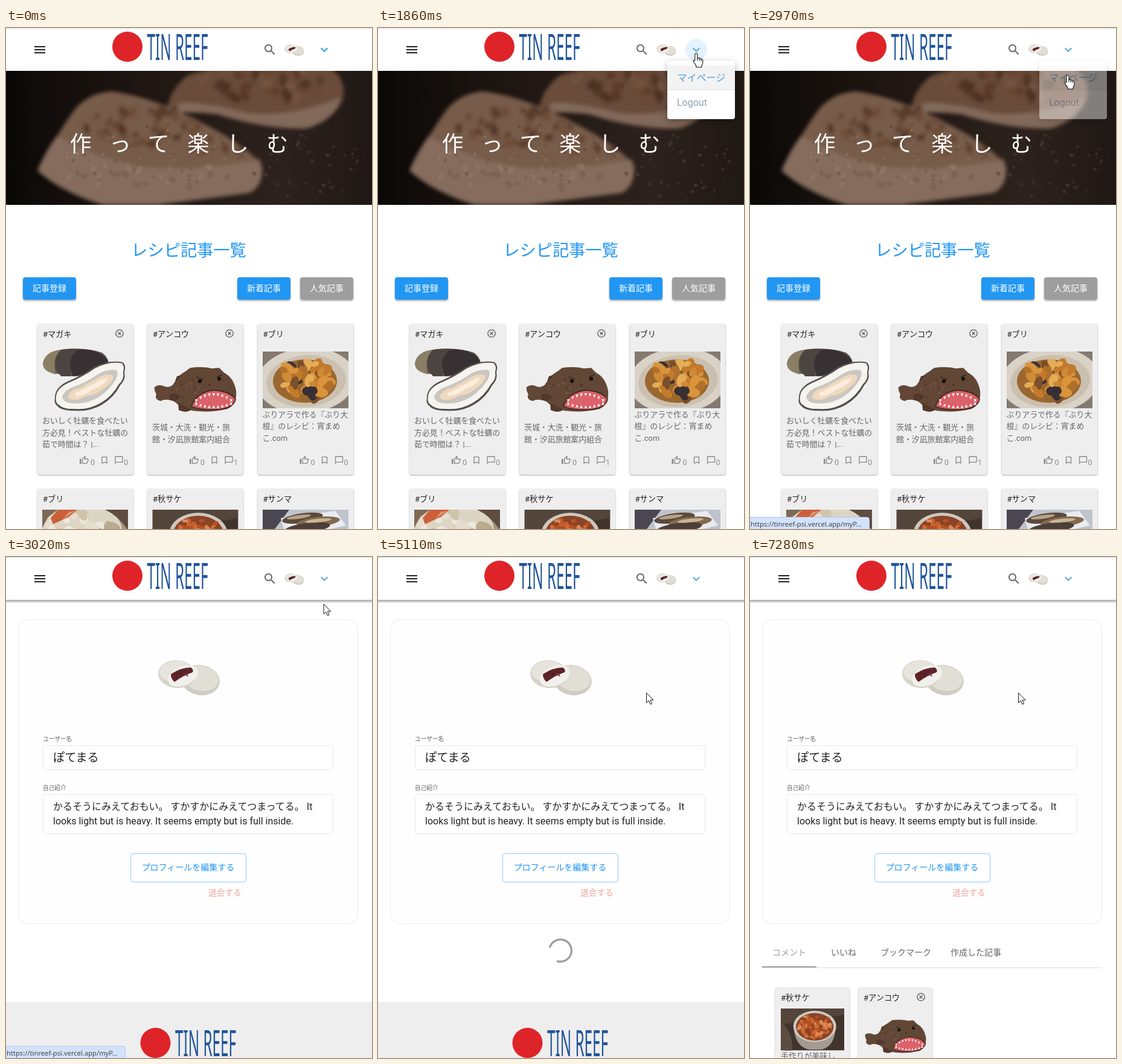
Recreate the animation shown at these times as an HTML page. Size 606 by 830 pixels, loop 8 s.

```html
<!DOCTYPE html>
<html lang="ja">
<head>
<meta charset="utf-8">
<title>Recipe site</title>
<style>
html, body { margin: 0; width: 100%; height: 100%; overflow: hidden; background: #fff; }
svg { display: block; width: 100%; height: 100%; }
text { font-family: Roboto, "Noto Sans CJK JP", "Noto Sans CJK", sans-serif; white-space: pre; }
.card { filter: drop-shadow(0 1px 1px rgba(0, 0, 0, .35)); }
.raised { filter: drop-shadow(0 2px 1.5px rgba(0, 0, 0, .35)); }
.menu { filter: drop-shadow(0 4px 6px rgba(0, 0, 0, .3)); }
.soft { filter: blur(3px); }
.hazy { filter: blur(1.2px); }
</style>
</head>
<body>
<svg id="stage" viewBox="0 0 606 830" preserveAspectRatio="none"></svg>
<script>
const BLUE = '#2196f3', GREY = '#9e9e9e', INK = '#222', MUTED = '#666';

// ---------- drawing helpers ----------
const text = (x, y, s, size, fill, more = '') =>
  `<text x="${x}" y="${y}" font-size="${size}" fill="${fill}" ${more}>${s}</text>`;
const rect = (x, y, w, h, fill, more = '') =>
  `<rect x="${x}" y="${y}" width="${w}" height="${h}" fill="${fill}" ${more}/>`;
const oval = (x, y, rx, ry, fill, turn = 0, more = '') =>
  `<ellipse rx="${rx}" ry="${ry}" fill="${fill}" transform="translate(${x} ${y}) rotate(${turn})" ${more}/>`;
const path = (d, fill, more = '') => `<path d="${d}" fill="${fill}" ${more}/>`;
const group = (s, more = '') => `<g ${more}>${s}</g>`;
const at = (x, y, k = 1) => `transform="translate(${x} ${y}) scale(${k})"`;
const use = (id, x, y, k) => `<use href="#${id}" ${at(x, y, k)}/>`;
const MID = 'text-anchor="middle"';

function random(seed) {
  return () => (seed = seed * 16807 % 2147483647) / 2147483647;
}

// Scatter of small ovals inside an ellipse
function lumps(seed, n, cx, cy, rx, ry, size, colors) {
  const rnd = random(seed);
  let s = '';
  for (let i = 0; i < n; i++) {
    const a = rnd() * 6.283, d = Math.sqrt(rnd()), k = size * (.6 + rnd() * .7);
    s += oval((cx + rx * d * Math.cos(a)).toFixed(1), (cy + ry * d * Math.sin(a)).toFixed(1),
      k.toFixed(1), (k * .65).toFixed(1), colors[i % colors.length], Math.round(rnd() * 180));
  }
  return s;
}

const ICONS = {
  menu: 'M3 18h18v-2H3zM3 13h18v-2H3zM3 6v2h18V6z',
  search: 'M15.5 14h-.79l-.28-.27C15.41 12.59 16 11.11 16 9.5 16 5.91 13.09 3 9.5 3S3 5.91 3 9.5 5.91 16 9.5 16c1.61 0 3.09-.59 4.23-1.57l.27.28v.79l5 4.99L20.49 19l-4.99-5zm-6 0C7.01 14 5 11.99 5 9.5S7.01 5 9.5 5 14 7.01 14 9.5 11.99 14 9.5 14z',
  more: 'M16.59 8.59L12 13.17 7.41 8.59 6 10l6 6 6-6z',
  like: 'M9 21h9c.83 0 1.54-.5 1.84-1.22l3.02-7.05c.09-.23.14-.47.14-.73v-2c0-1.1-.9-2-2-2h-6.31l.95-4.57.03-.32c0-.41-.17-.79-.44-1.06L14.17 1 7.58 7.59C7.22 7.95 7 8.45 7 9v10c0 1.1.9 2 2 2zM9 9l4.34-4.34L12 10h9v2l-3 7H9zM1 9h4v12H1z',
  mark: 'M17 3H7c-1.1 0-2 .9-2 2v16l7-3 7 3V5c0-1.1-.9-2-2-2zm0 15l-5-2.18L7 18V5h10z',
  chat: 'M20 2H4c-1.1 0-2 .9-2 2v18l4-4h14c1.1 0 2-.9 2-2V4c0-1.1-.9-2-2-2zm0 14H6l-2 2V4h16z'
};
const icon = (name, x, y, fill, k = 1, more = '') => path(ICONS[name], fill, at(x, y, k) + ' ' + more);
const close = (x, y) => `<path d="M6.2 0a6.2 6.2 0 1 1-12.4 0a6.2 6.2 0 1 1 12.4 0M-2.5-2.5l5 5M2.5-2.5l-5 5" fill="none" stroke="#555" stroke-width="1.3" ${at(x, y)}/>`;

// ---------- pictures ----------
function oyster() {
  return path('M1 22Q6 6 30 3Q70-2 98 8Q112 18 108 34Q80 48 50 47Q16 44 4 34Q-1 28 1 22Z', '#5b4d48') +
    path('M1 22Q6 6 30 3Q14 18 22 44Q-4 38 1 22Z', '#8a7f64') +
    path('M30 3Q46 0 60 2Q40 18 46 47H30Q12 24 30 3Z', '#4b4440') +
    path('M60 2Q96 2 108 22Q108 32 96 38L50 47Q36 18 60 2Z', '#383133') +
    path('M20 82Q20 66 40 56Q64 46 84 32Q106 20 130 23Q139 27 135 40Q138 52 128 62Q118 82 98 94Q78 106 52 104Q30 104 24 96Q18 92 20 82Z', '#55504d') +
    path('M22 80Q23 67 42 58Q66 48 86 34Q108 22 130 25Q136 29 133 40Q135 52 126 60Q115 80 96 91Q76 103 52 101Q34 102 26 94Q20 90 22 80Z', '#f6f4ee') +
    path('M32 81Q35 70 52 64Q74 56 92 43Q108 34 122 37Q126 42 121 52Q110 70 92 82Q72 93 52 92Q34 92 32 81Z', '#cac6c2') +
    path('M42 79Q45 70 62 66Q80 56 96 47Q112 41 117 47Q116 57 100 68Q88 78 74 79Q60 87 50 86Q40 85 42 79Z', '#f1d9bd') +
    path('M54 75Q70 68 84 60Q98 50 108 50Q102 62 84 68Q70 79 54 80Z', '#fbeee0');
}

function angler() {
  let teeth = '';
  for (let i = 0; i < 9; i++) {
    const x = 70 + i * 7.2, u = (i - 4) / 4.4;
    const top = 44 + 12 * u * u, low = 69 - 7 * u * u;
    teeth += `M${x - 2.2} ${top}h4.4l-2.2 5zM${x - 2.2} ${low}h4.4l-2.2-5z`;
  }
  return path('M1 34Q8 28 18 33Q27 36 34 27Q40 14 52 8L60 2Q80-1 96 3L108 2L116 10Q132 18 136 40Q138 62 122 70Q92 77 64 73Q46 70 34 58Q20 52 11 57Q0 54 4 46Q0 40 1 34Z', '#624736') +
    path('M40 60L41 72Q54 78 62 71ZM34 27L38 16L48 13Z', '#523828') +
    lumps(91, 12, 52, 36, 22, 20, 2.2, ['#735543', '#533a2a']) +
    path('M62 66Q70 42 100 39Q126 41 135 54Q132 68 108 71Q80 73 62 66Z', '#dc626a', 'stroke="#442d20" stroke-width="1.8"') +
    path(teeth, '#fff') +
    oval(76, 24, 3.2, 3.2, '#171312') + oval(108, 20, 3.2, 3.2, '#171312') +
    path('M70 17l11 4M114 13l-10 4M91 28l2 4', 'none', 'stroke="#3a281d" stroke-width="1.8"') +
    path('M26 46Q36 42 44 50Q38 59 26 55Z', '#523828');
}

// Bean bun, 102 x 60
function bun() {
  return oval(70, 34, 32, 25, '#cfccc1', 10) + oval(71, 31, 29, 21, '#e0ded5', 10) +
    oval(31, 24, 31, 23, '#d5d2c8', 4) + oval(28, 19, 26, 17, '#e6e4dc', -8) +
    oval(41, 27, 26, 16, '#f1f0ec', -22) +
    path('M21 24Q38 13 54 13Q59 16 57 21Q42 26 27 37Q21 32 21 24Z', '#5d2328') +
    lumps(23, 9, 40, 24, 12, 4, 2.2, ['#6d2a2f', '#4c1b20']);
}

const stew = () => rect(0, 0, 142, 94, '#857a70') + oval(72, 48, 82, 54, '#d9d2c6', -5) +
  oval(72, 49, 66, 43, '#cbc0b0', -5) + oval(70, 49, 53, 36, '#9a672f') +
  lumps(7, 60, 70, 49, 46, 31, 10, ['#d9943c', '#c47a2b', '#e3ad58', '#7a4f2b', '#cf8a35', '#b0702c', '#383032']);
const hotpot = () => rect(0, 0, 142, 94, '#a4937c') + oval(66, 34, 66, 44, '#ddd5c4') +
  lumps(17, 24, 64, 30, 56, 26, 11, ['#eee9de', '#cfc4aa', '#e5dece', '#b9ab8d']) +
  path('M0 0H26L10 12L0 30Z', '#7d6a56') + path('M26 0H58L44 12L18 24L14 14Z', '#cb5f3a') + path('M44 4L54 2L34 16Z', '#e09a76') +
  path('M104 0H142V34Q126 10 104 0Z', '#5f4d41');
const salmon = () => rect(0, 0, 142, 94, '#41342d') + path('M0 0H142V14L0 36Z', '#54453b') +
  path('M29 38Q30 84 62 92H92Q122 84 123 38Z', '#a39a92') +
  oval(76, 40, 48, 35, '#cfc8c0') + oval(76, 41, 42, 31, '#8a4326') +
  lumps(29, 64, 76, 39, 37, 27, 5.5, ['#cf6a35', '#b54f22', '#de8954', '#c45f2c']) +
  oval(6, 66, 16, 38, '#5d4d41', -20);
const saury = () => rect(0, 0, 142, 94, '#bfc3cc') + path('M0 0H44L20 32L0 40Z', '#4a4752') +
  path('M30 14L120 2L138 26L40 50Z', '#e9ebef') +
  group(oval(66, 14, 34, 8, '#5a4a3d', -8) + oval(92, 20, 36, 8, '#82694f', -6) + oval(74, 30, 38, 8, '#4c3e38', -7) +
    oval(60, 12, 20, 3, '#b9a284', -8) + oval(92, 18, 22, 3, '#c9b592', -6));

function hero() {
  const crust = ['#3d2618', '#7b5a45', '#4a2d1c', '#69462f'];
  return rect(0, 0, 606, 222, 'url(#pan)') +
    group(
      path('M266 70Q268 34 300 8Q340-8 400-6H535Q566 14 557 50Q540 84 490 96Q420 94 350 68Q300 62 266 70Z', '#6a4c3a') +
      path('M266 72Q270 54 300 52Q350 56 400 70Q470 78 553 44Q550 78 500 95Q430 98 350 72Q300 66 266 72Z', '#82695a') +
      path('M52 165Q80 112 112 66Q134 38 172 34Q230 40 300 74Q390 116 424 156Q428 188 404 202Q330 212 250 222H160Q90 200 52 165Z', '#785c4a') +
      path('M52 165Q66 132 84 108Q150 146 230 160Q330 166 420 146Q430 186 404 202Q330 212 250 222H160Q90 200 52 165Z', '#856c5d'), 'class="soft"') +
    group(lumps(41, 44, 420, 24, 118, 26, 9, crust) + lumps(53, 60, 225, 92, 95, 34, 8, crust) +
      lumps(59, 16, 350, 128, 46, 16, 6, crust), 'class="soft" opacity=".65"') +
    group(lumps(61, 70, 250, 138, 150, 54, 2, ['#40301f', '#b09582', '#4d4023']) +
      lumps(67, 30, 240, 176, 140, 24, 6, ['#745b4c', '#977c6c']) +
      lumps(77, 60, 500, 156, 100, 56, 3, ['#55453c', '#30241f', '#5f5045']), 'class="hazy" opacity=".55"');
}

// ---------- page parts ----------
const logo = (x, y) => group(`<circle cx="31" cy="26" r="25" fill="#de2429"/>` +
  text(0, 0, 'TIN REEF', 60, '#20549b', 'style="font-family:Noto Sans,sans-serif" transform="translate(63.5 48) scale(.404 1)"'), at(x, y));

const button = (x, s, fill, id = '') => group(rect(x, 413, 88, 37, fill, `rx="4" ${id}`), 'class="raised"') +
  text(x + 44, 436, s, 14, '#fff', MID + ' font-weight="500"');

const cardBox = (x, y, w, title) => rect(x, y, w, 250, '#eee', 'rx="4" class="card"') +
  text(x + 9, y + 22, title, 13.2, INK);

function card(x, title, art, lines, y, chats) {
  return cardBox(x, 490, 159, title) + art +
    lines.map((s, i) => text(x + 8, y + i * 19.6, s, 12.9, MUTED)).join('') +
    icon('like', x + 69.3, 708, '#888', .667) + text(x + 88, 723.5, 0, 12.5, '#8a8f8a') +
    icon('mark', x + 103, 708, '#888', .667) +
    icon('chat', x + 127, 708, '#888', .667) + text(x + 143, 723.5, chats, 12.5, '#8a8f8a');
}

const header = rect(0, 0, 606, 71, '#fff') + rect(0, 0, 606, 1, '#dcdcdc') +
  icon('menu', 44, 24, INK) + logo(170, 5) + icon('search', 425, 24, '#68686d') +
  use('bun', 461, 27, .32) + '<circle id="ripple" cx="527" cy="36" r="0" fill="#2196f3"/>' +
  icon('more', 515, 24, BLUE, 1, 'id="chevron"');

const home = group(hero(), at(0, 71) + ' clip-path="url(#heroBox)"') +
  text(105.5, 204.5, '作って楽しむ', 36, '#fff', 'font-weight="300" letter-spacing="29.5"') +
  text(302.5, 377.5, 'レシピ記事一覧', 27.2, BLUE, MID + ' font-weight="300"') +
  button(28, '記事登録', BLUE) + button(383, '新着記事', BLUE, 'id="newest"') + button(487, '人気記事', GREY) +
  card(52, '#マガキ', use('oyster', 61, 530), ['おいしく牡蠣を食べたい', '方必見！ベストな牡蠣の', '茹で時間は？ |...'], 655, 0) + close(188, 506) +
  card(234, '#アンコウ', use('angler', 245, 561), ['茨城・大洗・観光・旅', '館・汐凪旅館案内組合'], 666, 1) + close(370, 506) +
  card(416.5, '#ブリ', use('stew', 425, 536), ['ぶりアラで作る『ぶり大', '根』のレシピ：宵まめ', 'こ.com'], 644.5, 0) +
  cardBox(52, 763, 159, '#ブリ') + use('hotpot', 60, 798) +
  cardBox(234, 763, 159, '#秋サケ') + use('salmon', 242.5, 798) +
  cardBox(416.5, 763, 159, '#サンマ') + use('saury', 425, 798);

const field = (y, h) => rect(61.5, y + .5, 480, h, '#fff', 'rx="4" stroke="#e8e8e8"');

const profile = rect(0, 71, 606, 6, 'url(#drop)') +
  rect(20.5, 103.5, 562, 504, '#fefefe', 'rx="16" stroke="#ececec"') + use('bun', 252, 170) +
  text(61, 304.5, 'ユーザー名', 9.7, MUTED) + field(312, 40) + text(78, 339, 'ぽてまる', 19.2, INK) +
  text(61, 386, '自己紹介', 9.7, MUTED) + field(393, 65) +
  text(78, 419, 'かるそうにみえておもい。 すかすかにみえてつまってる。 It', 16, INK) +
  text(78, 443, 'looks light but is heavy. It seems empty but is full inside.', 16, INK) +
  rect(206.5, 491.5, 191, 47, '#fff', 'rx="4" stroke="#90caf9"') +
  text(301.5, 519, 'プロフィールを編集する', 14, BLUE, MID) +
  text(335, 561, '退会する', 13.7, '#efa79c');

const footer = rect(0, 737, 606, 93, '#eee') + logo(216.5, 779) +
  `<g transform="translate(302 652) scale(.909)"><circle id="spinner" r="20.2" fill="none" stroke="${GREY}" stroke-width="3.6"/></g>`;

const results = rect(20, 680, 563, 1, '#ddd') + rect(20, 678, 90, 2, GREY) +
  text(37, 660, 'コメント', 14, GREY) + text(134, 660, 'いいね', 14, MUTED) +
  text(216, 660, 'ブックマーク', 14, MUTED) + text(332, 660, '作成した記事', 14, MUTED) +
  cardBox(42, 713, 123, '#秋サケ') + use('salmon', 51, 748, .74) + text(51, 831, '手作りが美味し', 12.9, MUTED) +
  cardBox(179, 713, 123, '#アンコウ') + use('angler', 190, 766, .745) + close(283, 729);

const menu = rect(479, 54, 112, 97, '#fff', 'rx="4" class="menu"') + rect(479, 62, 112, 41, '#f3f3f3') +
  rect(479, 102, 112, 1, '#e2e2e2') +
  text(495.5, 88, 'マイページ', 16, '#4a9fdc') + text(495, 128.5, 'Logout', 16, '#8fa3b0');

const status = path('M0 810.5H193.5Q197.5 810.5 197.5 814.5V831H0Z', '#d3e3fd', 'stroke="#b3c6e6"') +
  text(1, 826, 'https://tinreef-psi.vercel.app/myP...', 11.2, '#444', 'style="font-family:Noto Sans,sans-serif"');

const art = { oyster, angler, bun, stew, hotpot, salmon, saury };
const photos = ['stew', 'hotpot', 'salmon', 'saury'];
const stage = document.getElementById('stage');
stage.innerHTML = `<defs>
  <linearGradient id="pan"><stop offset="0" stop-color="#0a0807"/><stop offset=".3" stop-color="#1c1410"/><stop offset=".75" stop-color="#2d221d"/><stop offset="1" stop-color="#1f1815"/></linearGradient>
  <linearGradient id="drop" x2="0" y2="1"><stop stop-opacity=".36"/><stop offset="1" stop-opacity="0"/></linearGradient>
  <clipPath id="heroBox"><rect width="606" height="222"/></clipPath>
  <clipPath id="photoBox"><rect width="142" height="94"/></clipPath>` +
  Object.keys(art).map(id => group(art[id](), `id="${id}"` + (photos.includes(id) ? ' clip-path="url(#photoBox)"' : ''))).join('') +
  '</defs>' + rect(0, 0, 606, 830, '#fff') +
  group(home, 'id="home"') + group(profile, 'id="profile"') + group(footer, 'id="footer"') +
  group(results, 'id="results"') + header + group(menu, 'id="menu"') + group(status, 'id="status"') +
  group(path('M-2 2Q-2 0 0 0Q2 0 2 2V8Q4.5 6.5 5.3 8.7Q7.7 7.6 8.3 9.7Q11 9 11 12V15Q11 18 9 20V23H0V20.5L-4.6 13.5Q-5.6 11-2 12ZM2 8V12M5.3 9V12.5M8.3 10V13', '#fff', 'stroke="#111" stroke-width="1.1"'), 'id="hand"') +
  group(path('M0 0V16.5L3.8 13L6.4 19L9 17.9L6.4 12H11.6Z', '#fff', 'stroke="#111"'), 'id="arrow"');

// ---------- motion ----------
const $ = {};
stage.querySelectorAll('[id]').forEach(e => $[e.id] = e);
const set = (e, o) => { for (const k in o) e.setAttribute(k, o[k]); };
const show = (e, on) => { e.style.display = on ? '' : 'none'; };
const ramp = (t, a, b) => Math.min(1, Math.max(0, (t - a) / (b - a)));
const smooth = u => u * u * (3 - 2 * u);

// cubic-bezier(.42, 0, .58, 1)
function easeInOut(x) {
  let lo = 0, hi = 1;
  for (let i = 0; i < 20; i++) {
    const s = (lo + hi) / 2, r = 1 - s;
    if (1.26 * s * r * r + 1.74 * s * s * r + s * s * s < x) lo = s; else hi = s;
  }
  return smooth(lo);
}

const TRACK = [[400, 500, 712], [610, 458, 440], [960, 530, 50], [1170, 528, 33], [1240, 527, 32],
  [1650, 527, 32], [2350, 526, 78], [3990, 526, 78], [4760, 444.5, 225]];

function pointer(t) {
  let i = 0;
  while (i < TRACK.length - 2 && t >= TRACK[i + 1][0]) i++;
  const [a, ax, ay] = TRACK[i], [b, bx, by] = TRACK[i + 1];
  const u = smooth(ramp(t, a, b));
  return [ax + (bx - ax) * u, ay + (by - ay) * u];
}

function step(t) {
  const from = b => b + 70 * Math.floor((t - b) / 70);
  if (t < 1240) return from(400);
  if (t < 1440) return 1240;
  return t < 2980 ? from(1440) : from(3850);
}

function spin(t) {
  const p = (t - 3010) / 1470 % 1;
  const a = easeInOut(ramp(p, 0, .5)), b = easeInOut(ramp(p, .5, 1));
  set($.spinner, {
    'stroke-dasharray': `${1 + 99 * a} 200`,
    'stroke-dashoffset': -(15 * a + 110 * b),
    transform: `rotate(${360 * p})`
  });
}

function draw(time) {
  const t = step(time), mine = t >= 3010, loaded = t >= 7280;
  show($.home, !mine);
  show($.profile, mine);
  show($.footer, mine && !loaded);
  show($.results, loaded);
  show($.spinner, t > 3010);
  if (mine) spin(t);

  const [x, y] = pointer(t);
  const onNew = y > 413 && y < 450 && x > 383 && x < 471;
  const hand = !mine && (y < 60 || t > 1400 || onNew || y > 490 && y < 740);
  show($.hand, t >= 400 && hand);
  show($.arrow, t >= 400 && !hand);
  set(hand ? $.hand : $.arrow, { transform: `translate(${x} ${y})` });
  set($.newest, { fill: t >= 400 && onNew ? '#1976d2' : BLUE });

  const grow = ramp(t, 1440, 1790);
  set($.ripple, { r: grow ? 8 + 10 * grow : 0, opacity: .16 * (1 - ramp(t, 1790, 2100)) });
  set($.chevron, { fill: t < 1500 ? BLUE : '#58a6db' });

  const open = smooth(ramp(t, 1480, 1760)), k = .75 + .25 * open;
  set($.menu, {
    opacity: open * (1 - ramp(t, 2820, 2980)),
    transform: `translate(535 54) scale(${k} ${k * k}) translate(-535 -54)`
  });
  show($.menu, open > 0 && !mine);
  set($.status, { opacity: ramp(t, 2500, 2750) * (1 - ramp(t, 3290, 3500)) });
}

const start = performance.now();
function tick() {
  draw((performance.now() - start) % 8000);
  requestAnimationFrame(tick);
}
tick();
</script>
</body>
</html>
```
